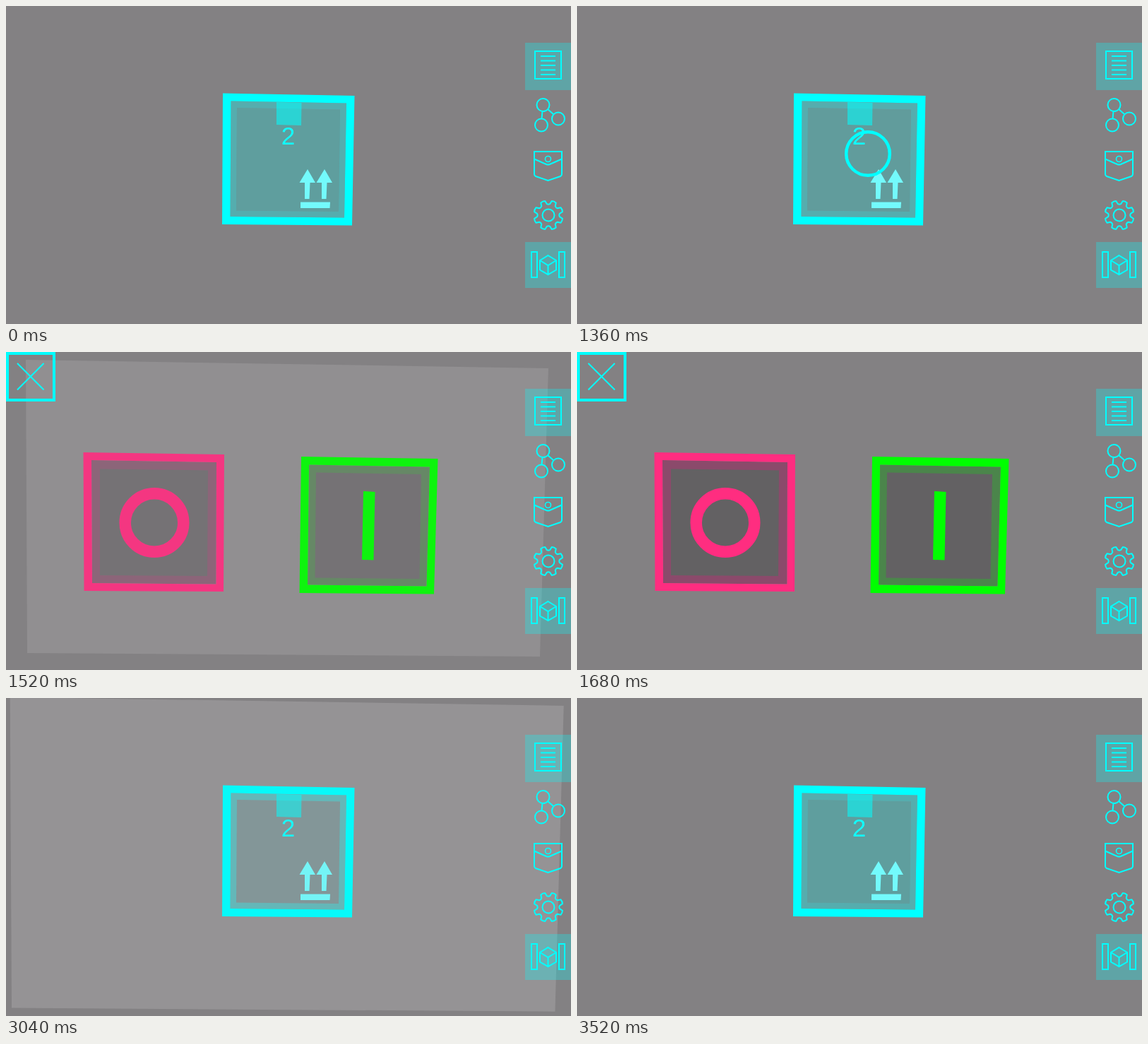
Recreate the animation shown at these times as an HTML page. Size 800x450 px, loop 3600 ms.

```html
<!DOCTYPE html>
<html lang="en">
<head>
<meta charset="utf-8">
<title>Box menu</title>
<style>
html, body { margin: 0; width: 100%; height: 100%; overflow: hidden; background: #838183; }
svg { display: block; width: 100%; height: 100%; }
.line { fill: none; stroke: #0ff; stroke-width: 2; }
text { font: 35px "Liberation Sans", Arial, sans-serif; fill: #1ff; text-anchor: middle; }
</style>
</head>
<body>
<svg viewBox="0 0 800 450">
  <rect width="800" height="450" fill="#838183"/>
  <polygon id="panel" fill="#fff"/>

  <g id="box">
    <polygon id="boxFill" points="327,144 473,146.500 471,291 326,289.500" fill="#5f9e9e"/>
    <path fill="#0ff" fill-opacity=".35" fill-rule="evenodd"
      d="M318.500 134.500L482 137.500L479 299.500L317.500 298ZM327 144L473 146.500L471 291L326 289.500Z"/>
    <path fill="#0ff" fill-rule="evenodd"
      d="M307 123.500L493.500 127L490 310.500L306 309ZM318.500 134.500L482 137.500L479 299.500L317.500 298Z"/>
    <path fill="#0ff" fill-opacity=".55" d="M383 136L418.500 137L418 169L383 168Z"/>
    <text x="399.500" y="195.500">2</text>
    <g fill="#73fafc">
      <path id="arrow" d="M427 231L438 250H430.500L429.500 273H423V250H415.500Z"/>
      <use href="#arrow" x="24"/>
      <path d="M417 277.500H459L458.500 286H417Z"/>
    </g>
  </g>

  <g id="buttons">
    <g id="fills">
      <path fill="#8b4a6b" d="M121 153L298 156L297.500 328.500L122 327Z"/>
      <path fill="#636163" d="M133 165.500L286 167.500L285 317L133 316Z"/>
      <path fill="#4b854b" d="M429 159.500L600 162.500L595.500 331.500L427 329.500Z"/>
      <path fill="#636163" d="M439 170.500L588 173L585.500 321L437.500 319.500Z"/>
    </g>
    <g fill="#ff2d80" fill-rule="evenodd">
      <path d="M109.500 142L309 145L308 339L110.500 338ZM121 153L298 156L297.500 328.500L122 327Z"/>
      <circle cx="210" cy="241.500" r="41.300" fill="none" stroke="#ff2d80" stroke-width="16.500"/>
    </g>
    <g fill="#0f0" fill-rule="evenodd">
      <path d="M418 148L611.500 151L606 342.500L415.500 341ZM429 159.500L600 162.500L595.500 331.500L427 329.500Z"/>
      <path d="M506 197L522.500 198L520.500 294.500L504 294Z"/>
    </g>
  </g>

  <g id="close" class="line">
    <rect x="2" y="2" width="66" height="66" stroke-width="4" style="stroke-width:4"/>
    <path d="M16 16L53.500 53.500M53.500 16L16 53.500"/>
  </g>
  <circle id="tap" class="line" cx="412" cy="209" r="30.800" style="stroke-width:4.500"/>

  <g fill="#0ff" fill-opacity=".28">
    <rect x="735" y="52" width="65" height="67"/>
    <rect x="735" y="334" width="65" height="65"/>
  </g>
  <g class="line">
    <path d="M749 64H786V103H749ZM757 71H778M757 77.500H778M757 84H778M757 90.500H778M757 97H778"/>
    <circle cx="760.500" cy="140" r="9"/>
    <circle cx="782" cy="159.500" r="9"/>
    <circle cx="758" cy="168.500" r="9"/>
    <path d="M767 146L775.500 153.500M759.500 149L758.500 159.500"/>
    <path d="M748 206H787V238Q787 240 785 241L767.500 247L750 241Q748 240 748 238ZM748 216.500L765 224Q767.500 225 770 224L787 216.500"/>
    <circle cx="767.500" cy="216.500" r="4" stroke-width="1.600"/>
    <path id="gear" stroke-linejoin="round"/>
    <circle cx="768" cy="296" r="8.500"/>
    <path d="M744 348H752V384H744ZM783 348H791V384H783ZM767.500 353L779 360V373.500L767.500 380L756 373.500V360ZM756 360L767.500 367L779 360M767.500 367V380"/>
  </g>
</svg>
<script>
const LOOP = 3600, STEP = 80;
const OPEN = 1440, SHUT = 2960;
const SMALL = [195, 103, 605, 113, 595, 336, 195, 332];
const LARGE = [28, 11, 768, 23, 756, 431, 30, 426];
const el = id => document.getElementById(id);
const [panel, box, boxFill, buttons, fills, closer, tap] =
  ["panel", "box", "boxFill", "buttons", "fills", "close", "tap"].map(el);

const clamp = x => Math.max(0, Math.min(1, x));
const mix = (a, b, k) => a + (b - a) * k;
const ramp = (t, from, to) => clamp((t - from) / (to - from));
const show = (node, on) => node.setAttribute("visibility", on ? "visible" : "hidden");
const fade = (node, a) => node.setAttribute("opacity", a);

function gearPath(cx, cy, teeth) {
  const at = (r, a) => `${(cx + r * Math.cos(a)).toFixed(2)} ${(cy + r * Math.sin(a)).toFixed(2)}`;
  const pitch = 2 * Math.PI / teeth;
  let d = "";
  for (let i = 0; i < teeth; i++) {
    const a = (i + 0.5) * pitch;
    d += `${i ? "L" : "M"}${at(16, a - pitch * 0.33)}L${at(20.5, a - pitch * 0.2)}`;
    d += `Q${at(21.5, a)} ${at(20.5, a + pitch * 0.2)}L${at(16, a + pitch * 0.33)}`;
    d += `Q${at(14.8, a + pitch / 2)} ${at(16, a + pitch * 0.67)}`;
  }
  return d + "Z";
}

function drawPanel(size, alpha) {
  panel.setAttribute("points", SMALL.map((v, i) => mix(v, LARGE[i], size)).join(" "));
  fade(panel, alpha);
}

function draw(time) {
  const t = Math.floor(time % LOOP / STEP) * STEP;
  const opened = t >= OPEN && t < SHUT;
  show(box, !opened);
  show(buttons, opened);
  show(closer, opened);
  show(tap, t >= OPEN - STEP && t < OPEN);

  if (opened) {
    fade(buttons, mix(0.8, 1, ramp(t, OPEN, 1600)));
    fade(fills, mix(0.5, 1, ramp(t, OPEN, 1680)));
    drawPanel(mix(0.5, 1, ramp(t, OPEN, 1520)), mix(0.165, 0, ramp(t, OPEN, 1680)));
  } else if (t >= SHUT) {
    fade(box, mix(0.9, 1, ramp(t, SHUT, 3120)));
    fade(boxFill, ramp(t, SHUT, 3200));
    drawPanel(mix(1.7, 0, ramp(t, SHUT, 3200)) - ramp(t, 3200, 3440) * 0.7,
      mix(0.18, 0, ramp(t, SHUT, 3360)));
  } else {
    fade(box, 1);
    fade(boxFill, mix(1, 0.95, ramp(t, 0, 480)));
    drawPanel(0, 0);
  }
}

el("gear").setAttribute("d", gearPath(768, 296, 8));
const start = performance.now();
function tick() {
  draw(performance.now() - start);
  requestAnimationFrame(tick);
}
tick();
</script>
</body>
</html>
```
